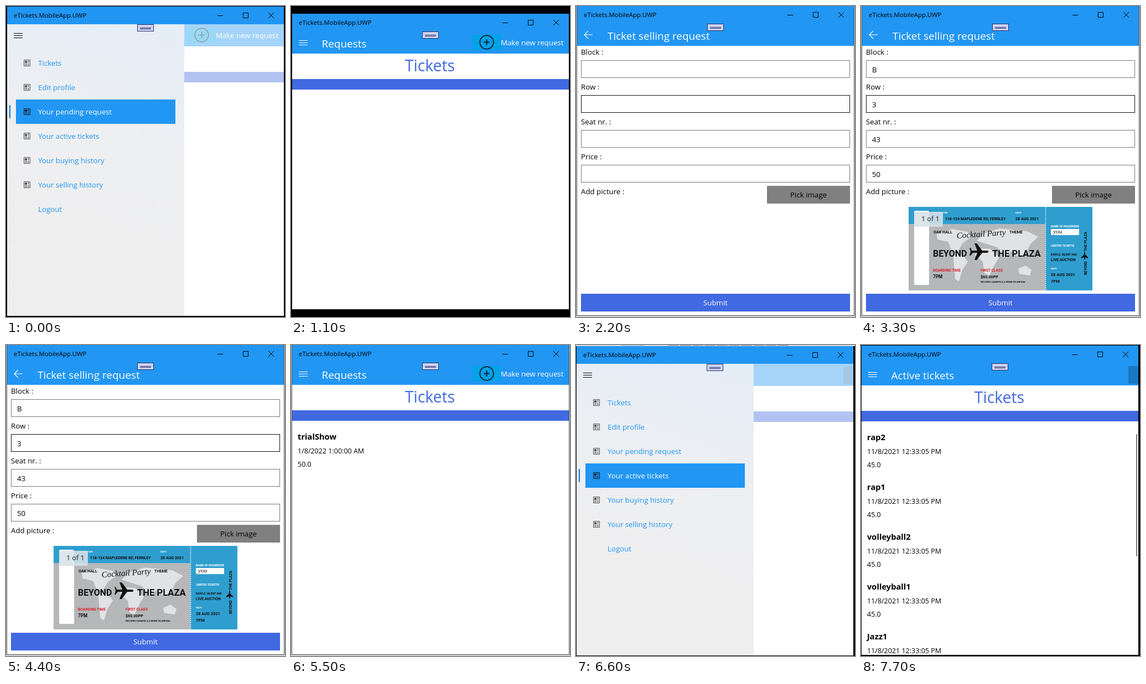
An HTML page that plays this animation: 504 by 562 pixels, repeating every 8 s.

```html
<!DOCTYPE html>
<html lang="en">
<head>
<meta charset="utf-8">
<title>Ticket app walkthrough</title>
<style>
  html, body { margin: 0; width: 100%; height: 100%; overflow: hidden; background: #000; }
  #stage { display: block; width: 504px; height: 562px; }
  text { font-family: "Open Sans", "Noto Sans", sans-serif; white-space: pre; }
  .ticket text { font-family: Roboto, "Liberation Sans", sans-serif; font-weight: 700; }
  .ticket .script { font-family: "Liberation Serif", serif; font-style: italic; font-weight: 400; }
</style>
</head>
<body>
<svg id="stage" viewBox="0 0 504 562"></svg>
<script>
const BLUE = '#2196f3', ROYAL = '#4169e1';
const LOOP = 8000;

const rect = (x, y, w, h, fill, extra = '') =>
  `<rect x="${x}" y="${y}" width="${w}" height="${h}" fill="${fill}" ${extra}/>`;
const line = (d, color, width = 1, extra = '') =>
  `<path d="${d}" fill="none" stroke="${color}" stroke-width="${width}" ${extra}/>`;
const label = (s, x, y, size, fill = '#000', extra = '') =>
  `<text x="${x}" y="${y}" font-size="${(size * 0.948).toFixed(2)}" fill="${fill}" ${extra}>${s}</text>`;
const centered = 'text-anchor="middle"';
const bold = 'font-weight="700"';

// Window chrome
const titleBar = () =>
  rect(2, 1, 500, 32, BLUE) +
  label('eTickets.MobileApp.UWP', 14, 21, 12) +
  line('M382 17.5h10M428.5 12.5h9v9h-9zM474 12l10 10M484 12l-10 10', '#000');

const grip = () =>
  rect(237.5, 33.5, 29, 12, '#ccd3f2', 'stroke="#2c2f66"') +
  line('M242 39.5h20M242 41.5h20', '#2c2f66');

const menuIcon = color => line('M14 49.5h16M14 53.5h16M14 57.5h16', color);

const header = title => rect(2, 33, 500, 40, BLUE) + label(title, 55.5, 62, 20, '#fff');

const newRequestButton = () =>
  rect(328, 39, 51, 27, '#00a2e8') +
  '<circle cx="353.5" cy="52.5" r="12.3" fill="none" stroke="#000" stroke-width="1.5"/>' +
  line('M348 52.5h11M353.5 47v11', '#000', 1.5) +
  label('Make new request', 379, 58, 14, '#fff');

const cutOffButton = () => rect(484, 38, 18, 32, '#1a78c2');

// Ticket lists
const row = ([name, date, price], i) => {
  const y = 172 + i * 90;
  return label(name, 12, y, 15.5, '#000', bold) +
    label(date, 12, y + 25, 13.2) + label(price, 12, y + 49, 13.2);
};

const listPage = (title, action, rows = []) =>
  header(title) + menuIcon('#fff') + action() +
  label('Tickets', 251, 105, 30, ROYAL, centered) +
  rect(2, 119, 500, 19, ROYAL) + rows.map(row).join('');

// Side menu over a faded page
const newsIcon = (y, color) =>
  line(`M32.5 ${y - 5.5}h11v11h-11z`, color) +
  rect(34, y - 4, 4, 4, color) +
  line(`M39 ${y - 3.5}h3M39 ${y - 1.5}h3M34 ${y + 1.5}h4M39 ${y + 1.5}h3M34 ${y + 3.5}h4M39 ${y + 3.5}h3`, color);

const menuItems = ['Tickets', 'Edit profile', 'Your pending request', 'Your active tickets',
  'Your buying history', 'Your selling history', 'Logout'];

const menuPage = (selected, action) =>
  `<g opacity=".4">${listPage('', action)}</g>` +
  rect(2, 33, 320, 540, 'url(#acrylic)') + menuIcon('#000') +
  rect(18, 81 + selected * 44, 288, 44, BLUE) +
  rect(6, 91 + selected * 44, 2, 24, '#0078d7', 'rx="1"') +
  menuItems.map((item, i) => {
    const y = 103 + i * 44, active = i === selected;
    return (item === 'Logout' ? '' : newsIcon(y, active ? '#123' : '#555')) +
      label(item, 58, y + 5, 14, active ? '#fff' : BLUE);
  }).join('');

// Selling form
const ticketPicture = () => `<g class="ticket">` +
  rect(86, 363, 332, 151, '#b5b7b9') +
  rect(86, 363, 247, 31, '#2f9ecf') + rect(333, 363, 85, 151, '#2f9ecf') +
  `<g fill="#fff" opacity=".6">
    <path d="M137 412l28-9 27 5 8 9-17 12-8 15-12-4-6-14-19-4z"/>
    <path d="M166 446l18 4 9 12-10 15-6 21-7-5-2-26z"/>
    <path d="M209 424l13-13 28-9 50 5 20 10-14 13-8 17-14 6-12-10-13 11-13-18z"/>
    <path d="M210 438l24 1 15 16-9 15-8 17-9-4-3-21-14-12z"/>
    <path d="M284 475l13-6 11 8-3 10-19-3z"/>
  </g>` +
  rect(96, 370, 27, 134, '#fff', 'rx="2"') +
  line('M333.5 364v150', '#fff', 1.6, 'stroke-dasharray="1.6 2"') +
  label('DESTINATION', 130, 375, 4.4, '#fff') +
  label('118-124 MAPLEDENE RD, FERNLEY', 152, 387, 7.2, '#111') +
  label('DATE', 279, 375, 4.6, '#fff') + label('28 AUG 2021', 279, 387, 7.5, '#111') +
  label('OAK HALL', 131, 411, 7.6, '#111') + label('THEME', 268, 411, 7.6, '#111') +
  label('Cocktail Party', 173, 420, 16, '#111', 'class="script" transform="rotate(-4 173 420)"') +
  label('BEYOND', 130, 453, 16.8, '#111') + label('THE PLAZA', 237, 453, 17.5, '#111') +
  `<path d="M200 442h10l-5-13h4l10 13h9q5 2 0 4h-9l-10 13h-4l5-13h-8l-4 5h-2l2-7-2-7h2z" fill="#111"/>` +
  label('BOARDING TIME', 130, 480, 7, '#d9232e') + label('7PM', 130, 492, 8.6, '#111') +
  label('FIRST CLASS', 216, 480, 7, '#d9232e') + label('$60.00PP', 216, 492, 7.6, '#111') +
  label('INCLUDES CANAPES &amp; A DRINK ON ARRIVAL', 216, 500, 4.2, '#111') +
  label('NAME OF PASSENGER', 343, 400, 5.3, '#fff') +
  rect(343, 403, 51, 11, '#fff', 'rx="1"') +
  label('you', 347, 411, 12, '#111', 'class="script"') +
  label('LIMITED TICKETS!', 343, 435, 5.4, '#fff') +
  label('RAFFLE, SILENT AND', 343, 451, 5.2, '#111') + label('LIVE AUCTION', 343, 461, 7.2, '#111') +
  label('DATE', 343, 476, 4.6, '#fff') +
  label('28 AUG 2021', 343, 488, 7.8, '#111') + label('7PM', 343, 500, 8, '#111') +
  label('BEYOND', 408, 486, 6.8, '#111', 'transform="rotate(-90 408 486)"') +
  label('THE PLAZA', 408, 443, 7, '#111', 'transform="rotate(-90 408 443)"') +
  `<path d="M403 458v-4l-5 2v-2l5-5v-4q1-3 2 0v4l5 5v2l-5-2v4z" fill="#111"/>` +
  rect(96, 372, 52, 27, '#d7e2e8', 'rx="3" opacity=".88"') +
  `</g>` + label('1 of 1', 109, 389, 13, '#555', 'font-weight="600"');

const fields = ['Block :', 'Row :', 'Seat nr. :', 'Price :'];

const formPage = (values, picture = '') =>
  header('') + label('Ticket selling request', 57, 62, 20, '#fff') +
  line('M30 53h-15M22 46l-7 7 7 7', '#fff', 1.2) +
  '<g transform="translate(0 1)">' +
  fields.map((name, i) => {
    const y = 98 + i * 63;
    return label(name, 9, y - 10, 14) +
      rect(9.5, y + .5, 485, 31, '#fff', `stroke="${i === 1 ? '#111' : '#7a7a7a'}"`) +
      label(values[i] || '', 20, y + 22, 14);
  }).join('') +
  label('Add picture :', 9, 340, 14) +
  rect(345, 325, 150, 32, '#808080') + label('Pick image', 420, 346, 14, '#000', centered) +
  picture +
  rect(9, 520, 486, 32, ROYAL) + label('Submit', 252, 541, 14, '#fff', centered) + '</g>';

const appWindow = (dx, dy, bottom, page) =>
  `<svg x="${dx}" y="${dy}" width="502" height="${bottom - dy}">` +
  rect(2, 1, 500, 580, '#fff') + page + titleBar() + grip() + '</svg>';

// A light desktop shows around the window's thin border
const onDesktop = page =>
  rect(0, 0, 504, 562, '#d9dce0') + rect(1, 0, 502, 560, '#444') + appWindow(0, -1, 559, page);

const taskStrip = () => rect(0, 0, 504, 2, '#d9dce0') +
  line('M166 .5h218', '#777a85', 1, 'stroke-dasharray="20 2"') + line('M82 .5h40', '#7fb2de');

const scrollBar = () => rect(498, 161, 2, 221, '#767676', 'rx="1"');

const activeTickets = ['rap2', 'rap1', 'volleyball2', 'volleyball1', 'Jazz1']
  .map(name => [name, '11/8/2021 12:33:05 PM', '45.0']);

const scenes = [
  [0, appWindow(0, 0, 560, menuPage(2, newRequestButton))],
  [1100, appWindow(0, 13, 548, listPage('Requests', newRequestButton))],
  [2200, onDesktop(formPage([]))],
  [3300, onDesktop(formPage(['B', '3', '43', '50'], ticketPicture()))],
  [5500, onDesktop(
    listPage('Requests', newRequestButton, [['trialShow', '1/8/2022 1:00:00 AM', '50.0']]))],
  [6600, taskStrip() + appWindow(-1, 1, 561, menuPage(3, cutOffButton))],
  [7700, appWindow(-1, 0, 560, listPage('Active tickets', cutOffButton, activeTickets) + scrollBar())],
];

const stage = document.getElementById('stage');
stage.innerHTML = `<defs><linearGradient id="acrylic" x1=".7" y1="0" x2=".5" y2="1">
    <stop offset="0" stop-color="#e5edf7"/><stop offset=".4" stop-color="#eeeff1"/>
    <stop offset="1" stop-color="#efeeee"/></linearGradient></defs>` +
  scenes.map(([, content]) => `<g class="scene" display="none">${content}</g>`).join('');
const groups = stage.querySelectorAll('.scene');

const start = performance.now();
function draw() {
  const time = (performance.now() - start) % LOOP;
  const current = scenes.findLastIndex(([from]) => time >= from);
  groups.forEach((group, i) => group.setAttribute('display', i === current ? 'inline' : 'none'));
  requestAnimationFrame(draw);
}
draw();
</script>
</body>
</html>
```
